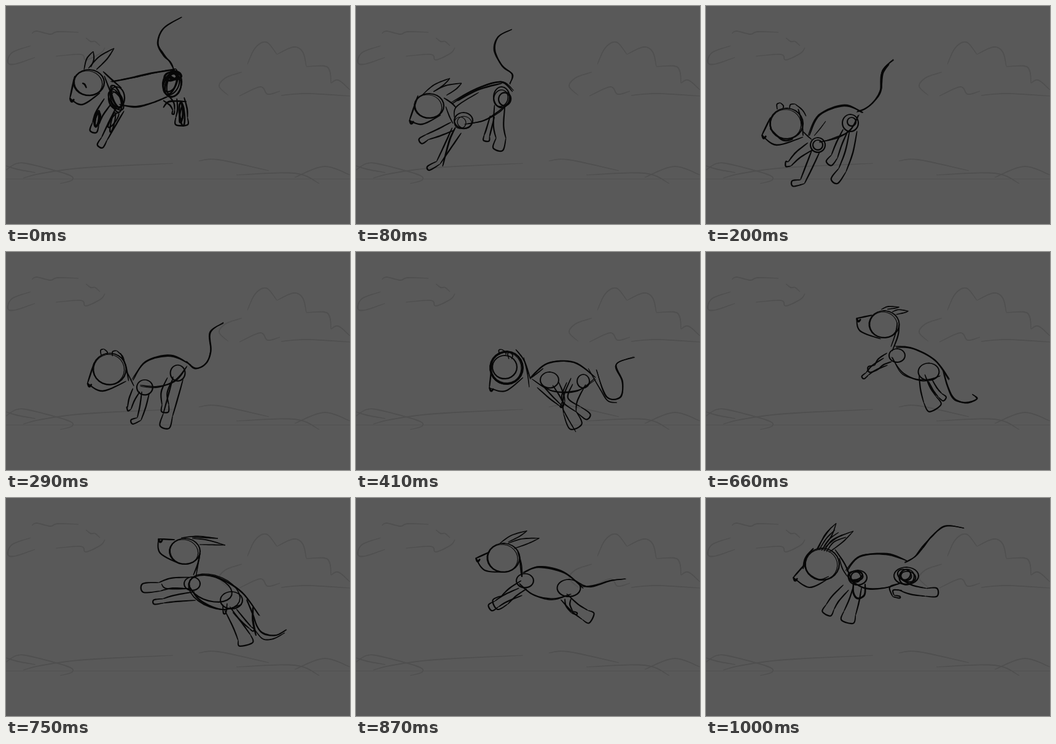
An HTML page that plays this animation: 560x356 px, repeating every 1.12 s.

```html
<!DOCTYPE html>
<html lang="en">
<head>
<meta charset="utf-8">
<title>Running sketch</title>
<style>
  html, body { margin: 0; width: 100%; height: 100%; overflow: hidden; background: #595959; }
  svg { display: block; width: 560px; height: 356px; overflow: hidden; }
  #scene { fill: #4f4f4f; }
  #strip { fill: #070707; animation: run 1120ms step-end infinite; }
  /* one pose per stage width, hard cuts */
  @keyframes run {
    0% { transform: translateX(0); }
    7.142% { transform: translateX(-560px); }
    14.285% { transform: translateX(-1120px); }
    17.857% { transform: translateX(-1680px); }
    25.892% { transform: translateX(-2240px); }
    31.249% { transform: translateX(-2800px); }
    36.607% { transform: translateX(-3360px); }
    48.214% { transform: translateX(-3920px); }
    58.928% { transform: translateX(-4480px); }
    66.964% { transform: translateX(-5040px); }
    77.678% { transform: translateX(-5600px); }
    89.285%, 100% { transform: translateX(-6160px); }
  }
</style>
</head>
<body>
<svg viewBox="0 0 560 356">
  <path d="M0 282.5H560" stroke="#525252"/>
  <g id="scene"></g>
  <g id="strip"></g>
</svg>
<script>
let layer, seed;

const rand = () => (seed = seed * 16807 % 2147483647) / 2147483647;
const jitter = size => (rand() - .5) * 2 * size;

function pairs(flat) {
  const pts = [];
  for (let i = 0; i < flat.length; i += 2) pts.push([flat[i], flat[i + 1]]);
  return pts;
}

function smooth(pts) {
  const out = [], last = pts.length - 1, steps = 8;
  for (let i = 0; i < last; i++) {
    const a = pts[Math.max(i - 1, 0)], b = pts[i], c = pts[i + 1], d = pts[Math.min(i + 2, last)];
    for (let k = 0; k < steps; k++) {
      const t = k / steps;
      out.push([0, 1].map(n => b[n] + t / 2 * (c[n] - a[n]
        + t * (2 * a[n] - 5 * b[n] + 4 * c[n] - d[n]
        + t * (3 * b[n] - a[n] - 3 * c[n] + d[n])))));
    }
  }
  return [...out, pts[last]];
}

// A pen line that thins toward both ends.
function ink(width, pts) {
  const left = [], right = [], last = pts.length - 1;
  pts.forEach(([x, y], i) => {
    const p = pts[Math.max(i - 1, 0)], q = pts[Math.min(i + 1, last)];
    const dx = q[0] - p[0], dy = q[1] - p[1], len = Math.hypot(dx, dy) || 1;
    const half = width / 2 * (.4 + .55 * Math.sqrt(Math.abs(Math.sin(Math.PI * i / last))));
    left.push([x - dy / len * half, y + dx / len * half]);
    right.unshift([x + dy / len * half, y - dx / len * half]);
  });
  const path = document.createElementNS("http://www.w3.org/2000/svg", "path");
  path.setAttribute("d", "M" + [...left, ...right].map(p => p.map(v => v.toFixed(1)).join(" ")).join("L") + "Z");
  layer.append(path);
}

const curve = (width, pts) => ink(width, smooth(pts));
const line = (width, ...flat) => curve(width, pairs(flat));

// The same line drawn twice, the second time loosely.
function retrace(width, pts, loose = 2) {
  curve(width, pts);
  curve(width * .75, pts.map(([x, y]) => [x + jitter(loose), y + jitter(loose)]));
}

function ring(width, x, y, rx, ry = rx, turn = 0) {
  const c = Math.cos(turn), s = Math.sin(turn);
  ink(width, Array.from({ length: 29 }, (_, i) => {
    const a = i / 4 - 2, u = rx * Math.cos(a), v = ry * Math.sin(a);
    return [x + u * c - v * s, y + u * s + v * c];
  }));
}

function scribble(width, x, y, rx, ry, turn, count) {
  for (let i = 0; i < count; i++) {
    ring(width, x + jitter(rx / 3), y + jitter(ry / 4), rx * (.5 + rand() / 2), ry * (.6 + rand() * .4), turn + jitter(.3));
  }
}

// Two edges along hip, knee and ankle, closed by a rounded paw.
function limb(width, [x0, y0, x1, y1, x2, y2, tx, ty, top, end]) {
  const pts = [[x0, y0], [x1, y1], [x2, y2], [tx, ty]];
  const sizes = [top, (top + end) / 2, end, end];
  const edge = side => pts.map(([x, y], i) => {
    const p = pts[Math.max(i - 1, 0)], q = pts[Math.min(i + 1, 3)];
    const dx = q[0] - p[0], dy = q[1] - p[1], k = side * sizes[i] / 2 / (Math.hypot(dx, dy) || 1);
    return [x - dy * k, y + dx * k];
  });
  const a = edge(1), b = edge(-1);
  curve(width, a.slice(0, 3));
  curve(width, b.slice(0, 3));
  curve(width, [a[2], a[3], b[3], b[2]]);
}

function dog(p) {
  const [w] = p.pen, [x, y, rx, ry] = p.skull, m = pairs(p.muzzle);
  ring(w, x, y, rx, ry);
  ring(w * .6, x - 1, y + 1, rx - 2, ry - 1, .3);
  curve(w * 1.1, [m[0], m[1]]);
  curve(w, [m[1], m[2], m[3]]);
  const [nx, ny] = m[1];
  line(w * 1.5, nx, ny - 1, nx + 3, ny + 5, nx + 7, ny + 1);
  for (const ear of [p.ear, p.farEar]) {
    const [a, b, c] = pairs(ear);
    line(w * .8, ...a, (a[0] + b[0]) / 2 - 3, (a[1] + b[1]) / 2 - 3, ...b);
    line(w * .8, ...b, (b[0] + c[0]) / 2 + 3, (b[1] + c[1]) / 2, ...c);
  }
  curve(w, pairs(p.nape));
  curve(w * .8, pairs(p.throat));
  retrace(w * 1.1, pairs(p.back));
  retrace(w * .9, pairs(p.belly));
  ring(w, ...p.shoulder);
  ring(w, ...p.hip);
  for (const leg of [p.farFore, p.fore, p.farHind, p.hind]) limb(w, leg);
  retrace(w, pairs(p.tail), 1.5);
  if (p.marks) p.marks();
}

function mix(a, b, t) {
  const out = {};
  for (const key in a) {
    if (key !== "marks") out[key] = a[key].map((v, i) => v + (b[key][i] - v) * t);
  }
  return out;
}

const glide = {
  pen: [2.7],
  skull: [135, 125, 25, 21], muzzle: [112, 114, 104, 151, 124, 161, 153, 142],
  ear: [127, 104, 142, 74, 138, 100], farEar: [134, 102, 176, 69, 147, 104],
  nape: [158, 107, 172, 120, 188, 134], throat: [160, 114, 166, 130, 171, 144],
  back: [172, 124, 205, 117, 240, 109, 275, 104], belly: [185, 161, 212, 164, 238, 158, 262, 148],
  shoulder: [180, 150, 13, 18], hip: [270, 128, 15, 20],
  fore: [186, 168, 172, 194, 160, 217, 153, 229, 14, 10], farFore: [166, 155, 152, 176, 146, 192, 142, 205, 14, 11],
  hind: [284, 150, 287, 168, 286, 182, 286, 194, 12, 19], farHind: [260, 150, 270, 160, 273, 170, 272, 176, 12, 3],
  tail: [286, 18, 257, 36, 247, 60, 256, 80, 268, 92, 274, 106]
};
glide.marks = () => {
  scribble(2.5, 180, 150, 11, 20, -.5, 5);
  scribble(2.5, 269, 128, 13, 22, .3, 5);
  scribble(4, 272, 114, 12, 7, 0, 3);
  scribble(3, 286, 172, 5, 20, 0, 3);
  scribble(3, 148, 186, 4, 17, .35, 3);
  scribble(2.5, 174, 186, 4, 20, .5, 2);
  line(3, 256, 166, 266, 156, 294, 156);
  line(3, 124, 126, 128, 128, 131, 134);
};

const reach = {
  pen: [2.5],
  skull: [119, 163, 24, 20], muzzle: [101, 146, 87, 187, 108, 193, 138, 178],
  ear: [108, 145, 153, 118, 126, 140], farEar: [126, 140, 172, 126, 147, 146],
  nape: [143, 150, 155, 158, 163, 166], throat: [146, 164, 152, 180, 158, 192],
  back: [156, 160, 192, 137, 235, 124, 255, 140], belly: [178, 193, 208, 187, 232, 172, 248, 158],
  shoulder: [175, 187, 15, 13], hip: [237, 149, 13, 17],
  fore: [164, 203, 150, 228, 134, 256, 118, 265, 17, 7], farFore: [158, 196, 134, 207, 116, 214, 105, 221, 14, 9],
  hind: [234, 162, 232, 195, 236, 216, 231, 234, 17, 16], farHind: [222, 180, 216, 202, 213, 212, 212, 220, 7, 9],
  tail: [254, 38, 232, 50, 226, 72, 238, 98, 255, 112, 250, 127]
};
reach.marks = () => {
  scribble(2, 238, 149, 13, 17, .2, 3);
  scribble(1.5, 172, 189, 17, 15, 0, 2);
  line(3, 165, 155, 198, 137, 238, 126);
  line(2, 160, 182, 164, 164, 200, 141);
  line(3, 162, 198, 152, 220, 141, 262);
};

const touch = {
  pen: [2.5],
  skull: [131, 192, 27, 25], muzzle: [105, 182, 91, 211, 115, 227, 158, 214],
  ear: [116, 169, 121, 158, 125, 168], farEar: [136, 168, 145, 160, 163, 180],
  nape: [150, 168, 156, 190, 158, 212], throat: [158, 205, 165, 212, 172, 218],
  back: [168, 212, 185, 178, 225, 163, 256, 174], belly: [184, 222, 212, 216, 235, 202, 248, 178],
  shoulder: [182, 227, 12, 12], hip: [235, 191, 13, 14],
  fore: [179, 236, 168, 262, 157, 287, 141, 290, 13, 9], farFore: [170, 229, 150, 243, 136, 258, 130, 258, 14, 8],
  hind: [240, 203, 233, 238, 222, 268, 209, 286, 12, 13], farHind: [227, 203, 217, 224, 209, 246, 200, 257, 8, 11],
  tail: [305, 87, 288, 106, 284, 137, 274, 155, 260, 167, 246, 172]
};
touch.marks = () => {
  ring(2.5, 182, 227, 8);
  ring(2.5, 237, 189, 7);
  line(4.5, 298, 94, 287, 110, 285, 136);
  line(3, 104, 200, 125, 219, 142, 217);
  line(1.5, 195, 188, 186, 200, 176, 212);
};

const tuck = {
  pen: [2.3],
  skull: [245, 189, 27, 27], muzzle: [222, 178, 217, 222, 243, 227, 272, 205],
  ear: [234, 168, 237, 159, 244, 168], farEar: [249, 175, 251, 163, 253, 175],
  nape: [260, 159, 274, 178, 284, 208], throat: [273, 172, 279, 198, 282, 221],
  back: [285, 205, 312, 182, 355, 180, 390, 205], belly: [287, 208, 320, 227, 360, 227, 389, 206],
  shoulder: [315, 209, 15, 13], hip: [370, 211, 10, 11],
  fore: [325, 215, 334, 232, 338, 244, 335, 252, 11, 4], farFore: [298, 218, 316, 236, 332, 250, 335, 253, 9, 3],
  hind: [362, 211, 349, 240, 348, 262, 358, 285, 26, 21], farHind: [348, 214, 340, 240, 362, 257, 378, 269, 10, 11],
  tail: [454, 172, 424, 183, 434, 212, 430, 237, 408, 236, 391, 192]
};
tuck.marks = () => {
  ring(3.5, 245, 189, 26, 26, .5);
  ring(2.5, 242, 188, 20, 19);
  line(2, 305, 190, 295, 198, 283, 207);
  line(2, 378, 190, 398, 225, 410, 243, 425, 246);
  line(2, 336, 255, 345, 272, 358, 294);
};

const crouch = {
  pen: [2.3],
  skull: [289, 149, 24, 23], muzzle: [267, 138, 242, 150, 251, 168, 285, 176],
  ear: [285, 123, 284, 114, 287, 123], farEar: [303, 130, 302, 116, 304, 128],
  nape: [313, 145, 313, 165, 301, 198], throat: [307, 140, 304, 160, 293, 180],
  back: [302, 186, 330, 186, 362, 200, 381, 224], belly: [306, 199, 325, 228, 355, 239, 379, 230],
  shoulder: [319, 198, 13, 11], hip: [358, 224, 16, 14],
  fore: [297, 205, 299, 220, 304, 233, 307, 237, 13, 4], farFore: [277, 198, 272, 214, 269, 230, 270, 240, 12, 4],
  hind: [343, 222, 337, 238, 341, 254, 355, 271, 9, 23], farHind: [358, 235, 358, 246, 364, 256, 374, 264, 5, 12],
  tail: [410, 250, 443, 255, 428, 271, 400, 269, 386, 250, 381, 222]
};
crouch.marks = () => {
  line(4, 261, 146, 271, 137);
  line(3.5, 295, 134, 291, 150, 292, 164);
  line(2.5, 285, 216, 276, 196, 283, 188, 300, 193, 320, 200);
  line(1.5, 284, 206, 300, 205, 322, 208);
  ring(2, 348, 263, 24, 12, .7);
};

const leap = {
  pen: [2.4],
  skull: [291, 87, 25, 21], muzzle: [275, 68, 248, 67, 251, 90, 284, 108],
  ear: [285, 65, 345, 66, 303, 64], farEar: [303, 66, 357, 77, 315, 76],
  nape: [316, 90, 312, 108, 305, 126], throat: [316, 90, 313, 106, 309, 130],
  back: [316, 125, 345, 130, 384, 154, 412, 192], belly: [298, 144, 318, 168, 352, 182, 384, 174],
  shoulder: [303, 140, 13, 11], hip: [367, 167, 18, 14],
  fore: [300, 139, 270, 139, 250, 145, 223, 147, 19, 14], farFore: [308, 160, 275, 164, 256, 168, 241, 170, 14, 7],
  hind: [360, 180, 377, 208, 388, 228, 391, 239, 10, 22], farHind: [372, 184, 388, 202, 398, 212, 403, 216, 8, 4],
  tail: [457, 215, 440, 224, 420, 222, 409, 210, 402, 190, 392, 165]
};
leap.marks = () => {
  ring(2.4, 333, 148, 36, 20, .3);
  ring(2, 339, 153, 44, 26, .38);
  line(3.5, 402, 178, 402, 200, 407, 225);
  line(2, 405, 215, 418, 230, 435, 230, 454, 220);
  line(2.5, 353, 174, 354, 188, 358, 187, 360, 172);
  line(2, 253, 140, 262, 148, 300, 148);
};

const float = {
  pen: [2.4],
  skull: [189, 108, 28, 26], muzzle: [161, 108, 142, 130, 168, 146, 196, 134],
  ear: [182, 84, 212, 41, 192, 80], farEar: [192, 82, 240, 54, 200, 89],
  nape: [210, 84, 226, 108, 236, 132], throat: [217, 98, 222, 115, 230, 128],
  back: [229, 120, 250, 96, 295, 91, 328, 103], belly: [233, 134, 260, 148, 290, 147, 315, 140],
  shoulder: [247, 130, 15, 12], hip: [326, 127, 20, 14],
  fore: [247, 144, 241, 168, 234, 188, 230, 202, 13, 20], farFore: [228, 146, 211, 164, 202, 178, 196, 189, 12, 15],
  hind: [316, 142, 335, 150, 358, 154, 376, 154, 17, 13], farHind: [318, 145, 302, 148, 305, 160, 315, 162, 12, 3],
  tail: [420, 49, 390, 46, 368, 62, 354, 80, 340, 96, 323, 105]
};
float.marks = () => {
  scribble(2.5, 247, 129, 13, 11, 0, 3);
  scribble(2.5, 326, 126, 15, 13, .5, 4);
  line(3, 175, 82, 162, 98, 158, 116);
  line(2, 160, 110, 168, 124, 185, 133, 200, 128);
  line(3.5, 240, 138, 240, 155, 247, 164, 258, 158, 259, 140);
  for (let i = 0; i < 5; i++) line(2, 180 + i * 4, 84 + i, 192 + i * 4, 64 + i * 2, 204 + i * 6, 48 + i * 4);
};

function drawScene() {
  line(2, 47, 84, 14, 95, 3, 92, 10, 76, 40, 65);
  line(2, 42, 45, 50, 41, 72, 46, 84, 42, 118, 43);
  line(2, 81, 82, 122, 79, 130, 88, 154, 77, 161, 68);
  line(2, 130, 52, 138, 58, 145, 58, 153, 65);
  line(2, 393, 95, 406, 68, 424, 59, 441, 79);
  line(2, 441, 79, 468, 67, 483, 75, 489, 99);
  line(2, 489, 99, 518, 98, 527, 106, 529, 126);
  line(2, 529, 126, 541, 121, 560, 137);
  line(2, 384, 108, 358, 117, 347, 131, 362, 146);
  line(2, 380, 147, 414, 132, 426, 144, 446, 139);
  line(2, 448, 146, 490, 143, 560, 147);
  line(2, 0, 268, 18, 257, 42, 259, 100, 275, 108, 284, 88, 290);
  line(2, 0, 261, 20, 267, 48, 272);
  line(2, 28, 281, 60, 273, 130, 264, 272, 257);
  line(2, 314, 253, 346, 251, 428, 269);
  line(2, 375, 276, 470, 273, 510, 290);
  line(2, 470, 280, 518, 262, 560, 276);
}

function addLayer(parent, x) {
  layer = document.createElementNS("http://www.w3.org/2000/svg", "g");
  layer.setAttribute("transform", `translate(${x} 0)`);
  document.getElementById(parent).append(layer);
}

addLayer("scene", 0);
drawScene();

const poses = [
  glide, reach, mix(reach, touch, .5), touch, mix(touch, tuck, .33), mix(touch, tuck, .67),
  tuck, crouch, mix(crouch, leap, .5), leap, mix(leap, float, .5), float
];
poses.forEach((pose, i) => {
  seed = 71 + i * 13;
  addLayer("strip", i * 560);
  dog(pose);
});
</script>
</body>
</html>
```
